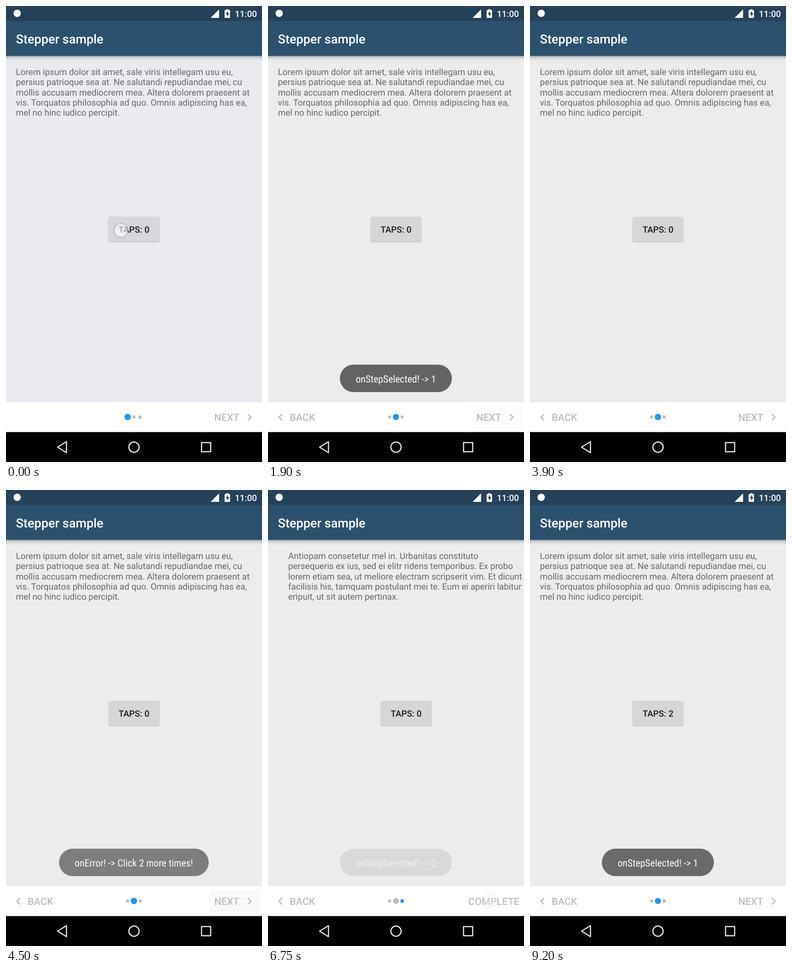
Write an HTML page that moves like this. It is 561 px wide and 998 px high and loops after 9.65 s.

```html
<!DOCTYPE html>
<html lang="en">
<head>
<meta charset="utf-8">
<title>Stepper sample</title>
<style>
html, body { margin: 0; height: 100%; overflow: hidden; background: #000; }
svg { display: block; width: 100vw; height: 100vh; font-family: Roboto, sans-serif; text-rendering: geometricPrecision; }
.body { font-size: 19.1px; fill: #676767; }
.medium { font-weight: 500; }
.tap { font-size: 19.1px; fill: #1b1b1b; text-anchor: middle; }
.nav { font-size: 21.8px; fill: #bdbdbd; }
.toast { font: 21.8px "Roboto Condensed", Roboto, sans-serif; font-stretch: condensed; fill: #fff; text-anchor: middle; }
.line { fill: none; stroke: #bdbdbd; stroke-width: 2.5; }
</style>
</head>
<body>
<svg viewBox="0 0 561 998">
  <defs>
    <linearGradient id="shade" x2="0" y2="1">
      <stop stop-opacity=".32"/>
      <stop offset=".4" stop-opacity=".1"/>
      <stop offset="1" stop-opacity="0"/>
    </linearGradient>
  </defs>
  <rect id="bg" width="561" height="998"/>
  <g id="pages"></g>
  <rect y="109" width="561" height="11" fill="url(#shade)"/>
  <rect width="561" height="109.100" fill="#2d516d"/>
  <rect width="561" height="32.700" fill="#264158"/>
  <circle cx="24.5" cy="16" r="8" fill="#fff"/>
  <path d="M448.300 26H467V7.300Z" fill="#fff"/>
  <path d="M479 9h3.500v-2h5v2h3.500v17h-12z" fill="#fff"/>
  <path d="M486.500 10.500l-5 7.500h3v5.500l5-7.500h-3z" fill="#264158"/>
  <text class="medium" x="501.400" y="23.800" font-size="19.1" fill="#fff">11:00</text>
  <text class="medium" x="21.800" y="81.500" font-size="27.3" fill="#fff">Stepper sample</text>

  <rect y="867" width="561" height="66" fill="#fff"/>
  <g id="dots"></g>
  <g id="back">
    <path class="line" d="M31 893l-7 7 7 7"/>
    <text class="nav medium" x="47.500" y="908.400">BACK</text>
  </g>
  <g id="next">
    <rect id="ripple" x="446.500" y="875" width="109" height="50" rx="2"/>
    <text class="nav medium" x="456.500" y="908.400">NEXT</text>
    <path class="line" d="M530 893l7 7-7 7"/>
  </g>
  <text id="complete" class="nav medium" x="551" y="908.400" text-anchor="end">COMPLETE</text>

  <rect y="932.500" width="561" height="65.500"/>
  <g fill="none" stroke="#e8e8e8" stroke-width="2.500" stroke-linejoin="round">
    <path d="M113 965.500L132.500 953.500V977.500Z"/>
    <circle cx="280.500" cy="965.500" r="11.300"/>
    <rect x="428.500" y="955.500" width="20" height="20"/>
  </g>
  <g id="toasts"></g>
  <circle id="touch" r="15" fill="#fff" fill-opacity=".6" stroke="#8090bc" stroke-opacity=".45" stroke-width="2"/>
</svg>
<script>
const LOOP = 9650, STEP = 50, WIDTH = 561;
const $ = id => document.getElementById(id);
const clamp = v => Math.max(0, Math.min(1, v));
const quint = (t, start) => 1 - (1 - clamp((t - start) / 200)) ** 5;
const swell = (t, start) => .5 - .5 * Math.cos(Math.PI * clamp((t - start) / 450));
const mix = (a, b, k) => `rgb(${a.map((v, i) => Math.round(v + (b[i] - v) * k))})`;

const lorem = ["Lorem ipsum dolor sit amet, sale viris intellegam usu eu,",
  "persius patrioque sea at. Ne salutandi repudiandae mei, cu",
  "mollis accusam mediocrem mea. Altera dolorem praesent at",
  "vis. Torquatos philosophia ad quo. Omnis adipiscing has ea,",
  "mel no hinc iudico percipit."];
const antiopam = ["Antiopam consetetur mel in. Urbanitas constituto",
  "persequeris ex ius, sed ei elitr ridens temporibus. Ex probo",
  "lorem etiam sea, ut meliore electram scripserit vim. Et dicunt",
  "facilisis his, tamquam postulant mei te. Eum ei aperiri labitur",
  "eripuit, ut sit autem pertinax."];

// Page changes: the scroll starts at `at`, dots and toast swell from `glow`.
const moves = [
  { at: 1515, glow: 1476, from: 0, to: 1 },
  { at: 6655, glow: 6644, from: 1, to: 2 },
  { at: 8830, glow: 8821, from: 2, to: 1 }
];
const toasts = [
  { text: "onStepSelected! -> 1", w: 245.5, from: 1476, until: 3550 },
  { text: "onError! -> Click 2 more times!", w: 328, from: 4183, until: 6310 },
  { text: "onStepSelected! -> 2", w: 245.5, from: 6644, until: 8740 },
  { text: "onStepSelected! -> 1", w: 245.5, from: 8821, until: LOOP }
];
// `page` marks taps on that page's button, `next` presses of the lower right button.
const touches = [
  { x: 252, y: 491, down: -50, up: 100, page: 0 },
  { x: 252, y: 491, down: 400, up: 550, page: 0 },
  { x: 487, y: 898, down: 1350, up: 1400, next: 1476 },
  { x: 487, y: 909, down: 4100, up: 4200, next: 4183 },
  { x: 252, y: 491, down: 5350, up: 5400, page: 1 },
  { x: 252, y: 491, down: 5750, up: 5850, page: 1 },
  { x: 487, y: 898, down: 6550, up: 6645, next: 6644 },
  { x: 64, y: 895, down: 8700, up: 8820 }
];

$("pages").innerHTML = [lorem, lorem, antiopam].map((lines, i) => `<g transform="translate(${i * WIDTH})">
  ${lines.map((s, n) => `<text class="body" x="21.8" y="${151.1 + n * 22.3}">${s}</text>`).join("")}
  <rect class="button" x="225.5" y="461.5" width="110" height="53.5" rx="3"/>
  <text class="tap medium" x="280.5" y="495.5"></text></g>`).join("");
$("dots").innerHTML = [266.5, 280.3, 294].map(x => `<circle cx="${x}" cy="899.5"/>`).join("");
$("toasts").innerHTML = toasts.map(({ text, w }) => `<g>
  <rect x="${280.2 - w / 2}" y="785" width="${w}" height="60" rx="30" fill="#626262"/>
  <text class="toast" x="280.2" y="824">${text}</text></g>`).join("");

const buttons = document.querySelectorAll(".button");
const labels = document.querySelectorAll(".tap");
const touchAlpha = (p, t) => t < p.down ? 0 : 1 - clamp((t - p.up) / 150);

function rippleAlpha(p, t) {
  if (!p.next || t < p.down) return 0;
  return t < p.next ? .06 * (t - p.down) / (p.next - p.down) : .06 * clamp(1 - (t - p.next) / 600);
}

function draw(t) {
  const warm = clamp(t / 750);
  $("bg").setAttribute("fill", mix([233, 235, 240], [236, 236, 236], warm));

  const scroll = moves.reduce((s, m) => s + (m.to - m.from) * quint(t, m.at), 0);
  $("pages").setAttribute("transform", `translate(${-scroll * WIDTH})`);
  buttons.forEach((b, i) => {
    const taps = touches.filter(p => p.page === i);
    const press = Math.max(0, ...taps.map(p => touchAlpha(p, t)));
    b.setAttribute("fill", mix([214, 215, 219], [214, 214, 214], warm));
    b.style.filter = `drop-shadow(0 ${1.3 + press / 2}px ${1 + press / 2}px rgba(0,0,0,.28))`;
    labels[i].textContent = "TAPS: " + taps.filter(p => t >= p.up).length;
  });

  const last = moves.filter(m => t >= m.at).pop();
  const page = last ? last.to : 0;
  const grow = last ? swell(t, last.glow) : 1;
  [...$("dots").children].forEach((dot, i) => {
    const size = i === page ? grow : last && i === last.from ? 1 - grow : 0;
    dot.setAttribute("r", 3.5 + 3.4 * size);
    dot.setAttribute("fill", i === page ? "#2196f3" : "#bdbdbd");
  });
  $("back").style.display = page ? "" : "none";
  $("next").style.display = page < 2 ? "" : "none";
  $("complete").style.display = page < 2 ? "none" : "";
  $("ripple").setAttribute("opacity", Math.max(...touches.map(p => rippleAlpha(p, t))));

  toasts.forEach(({ from, until }, i) =>
    $("toasts").children[i].setAttribute("opacity", swell(t, from) * (1 - clamp((t - until) / 330))));

  const finger = touches.filter(p => t >= p.down).pop();
  $("touch").setAttribute("cx", finger.x);
  $("touch").setAttribute("cy", finger.y);
  $("touch").setAttribute("opacity", touchAlpha(finger, t));
}

const begin = performance.now();
function tick() {
  const t = (performance.now() - begin) % LOOP;
  draw(Math.min(9200, Math.floor(t / STEP) * STEP));
  requestAnimationFrame(tick);
}
tick();
</script>
</body>
</html>
```
